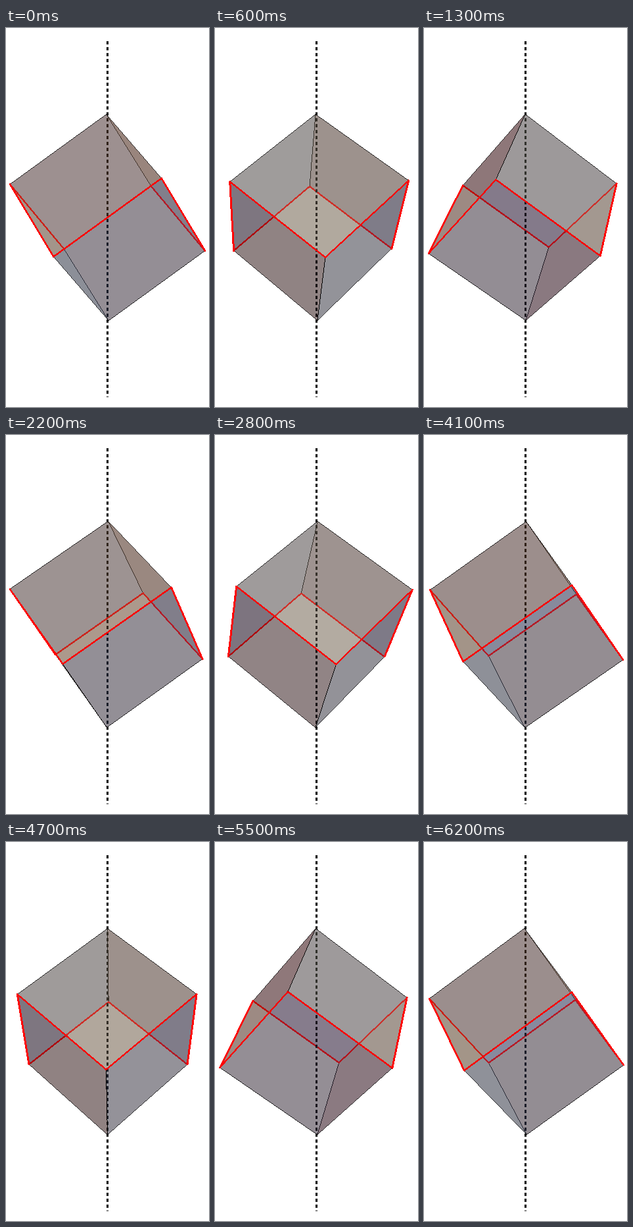
An HTML page for the animation above (6.3 s loop, 309 by 576 pixels).

```html
<!DOCTYPE html>
<html lang="en">
<head>
<meta charset="utf-8">
<title>Cube turning on its diagonal</title>
<style>
  html, body { margin: 0; width: 100%; height: 100%; overflow: hidden; background: #fff; }
  svg { display: block; width: 309px; height: 576px; }
  polygon { fill-opacity: .4; }
  line { stroke: #000; }
  line.ring { stroke: #f00; stroke-linecap: round; }
  line.axis { stroke-width: 3; stroke-dasharray: 5 4; }
</style>
</head>
<body>
<svg viewBox="0 0 309 576" shape-rendering="crispEdges">
  <g id="back"></g>
  <line class="axis" x1="154.5" y1="20" x2="154.5" y2="561"/>
  <g id="front"></g>
</svg>
<script>
const STEP = 100, STEPS = 63, TURN = 0.1;
const CX = 154.5, CY = 288;
const DIAG = 313.5, R = DIAG * Math.SQRT2 / 3, EYE = 8 * R;
const LEAN = 0.0115;
const GRAY = 127.5;
const AMBIENT = [0.4, 0.2, 0.2];
const LIGHTS = [
  { dir: [2, 0, 2], rgb: [0, 0.18, 0.5] },
  { dir: [2, 2, 3], rgb: [0.18, 0.5, 0.18] },
  { dir: [0, 2, 2], rgb: [0.5, 0.18, 0] },
  { dir: [0, 0, 2], rgb: [0, 0, 0.18] }
];

const dot = (a, b) => a[0] * b[0] + a[1] * b[1] + a[2] * b[2];
const sub = (a, b) => a.map((v, i) => v - b[i]);
const unit = a => a.map(v => v / Math.hypot(...a));
const cross = (a, b) => [
  a[1] * b[2] - a[2] * b[1],
  a[2] * b[0] - a[0] * b[2],
  a[0] * b[1] - a[1] * b[0]
];

// Vertices: 0 top, 1-3 upper ring, 4-6 lower ring, 7 bottom
const ringPoint = (deg, y) => {
  const a = deg * Math.PI / 180;
  return [R * Math.sin(a), y, R * Math.cos(a)];
};
const ring = (first, y) => [0, 120, 240].map(d => ringPoint(first + d, y));
const lean = ([x, y, z]) => [
  x * Math.cos(LEAN) - y * Math.sin(LEAN),
  y * Math.cos(LEAN) + x * Math.sin(LEAN),
  z
];
const cube = [
  [0, DIAG / 2, 0],
  ...ring(-90, DIAG / 6),
  ...ring(90, -DIAG / 6),
  [0, -DIAG / 2, 0]
].map(lean);

const faces = [], edges = [];
for (let k = 0; k < 3; k++) {
  const i = (k + 1) % 3, j = (k + 2) % 3;
  faces.push([0, 1 + i, 4 + k, 1 + j], [7, 4 + i, 1 + k, 4 + j]);
  edges.push([0, 1 + k], [7, 4 + k], [1 + k, 4 + i], [1 + k, 4 + j]);
}
const isRing = ([a, b]) => a > 0 && a < 7 && b > 0 && b < 7;
edges.sort((a, b) => isRing(a) - isRing(b));

function spin([x, y, z], angle) {
  const c = Math.cos(angle), s = Math.sin(angle);
  return [x * c + z * s, y, z * c - x * s];
}

function project([x, y, z]) {
  const k = EYE / (EYE - z);
  return [CX + x * k, CY - y * k];
}

// Both sides are lit, so the normal is turned towards the eye.
function describe(face, pts) {
  const [a, b, , d] = face.map(i => pts[i]);
  let n = unit(cross(sub(b, a), sub(d, a)));
  const centre = face.reduce((sum, i) => sum.map((v, m) => v + pts[i][m] / 4), [0, 0, 0]);
  if (dot(n, centre) < 0) n = n.map(v => -v);
  const toEye = sub([0, 0, EYE], centre);
  const isFront = dot(n, toEye) > 0;
  if (!isFront) n = n.map(v => -v);
  const rgb = AMBIENT.map((base, ch) => GRAY * LIGHTS.reduce(
    (sum, l) => sum + l.rgb[ch] * Math.max(0, dot(n, unit(l.dir))), base));
  return { face, isFront, fill: `rgb(${rgb.map(Math.round)})` };
}

// A line covers a fixed number of pixels across its main direction.
function lineTag([[x1, y1], [x2, y2]], isRed) {
  const dx = Math.abs(x2 - x1), dy = Math.abs(y2 - y1);
  const width = (isRed ? 3 : 1) * Math.max(dx, dy) / Math.hypot(dx, dy);
  return `<line${isRed ? ' class="ring"' : ""} x1="${x1}" y1="${y1}" x2="${x2}" y2="${y2}"` +
    ` stroke-width="${width.toFixed(3)}"/>`;
}

const layers = {
  back: document.getElementById("back"),
  front: document.getElementById("front")
};

function draw(ms) {
  const angle = Math.floor(ms / STEP) % STEPS * TURN;
  const pts = cube.map(p => spin(p, angle));
  const flat = pts.map(p => project(p).map(v => v.toFixed(2)));
  const sides = faces.map(f => describe(f, pts));

  const polygon = s =>
    `<polygon points="${s.face.map(i => flat[i]).join(" ")}" fill="${s.fill}"/>`;
  const line = e => lineTag(e.map(i => flat[i]), isRing(e));
  const onFront = e =>
    sides.some(s => s.isFront && e.every(i => s.face.includes(i)));

  for (const name in layers) {
    const near = name === "front";
    layers[name].innerHTML =
      sides.filter(s => s.isFront === near).map(polygon).join("") +
      edges.filter(e => onFront(e) === near).map(line).join("");
  }
}

const start = performance.now();
function tick() {
  draw(performance.now() - start);
  requestAnimationFrame(tick);
}
draw(0);
requestAnimationFrame(tick);
</script>
</body>
</html>
```
